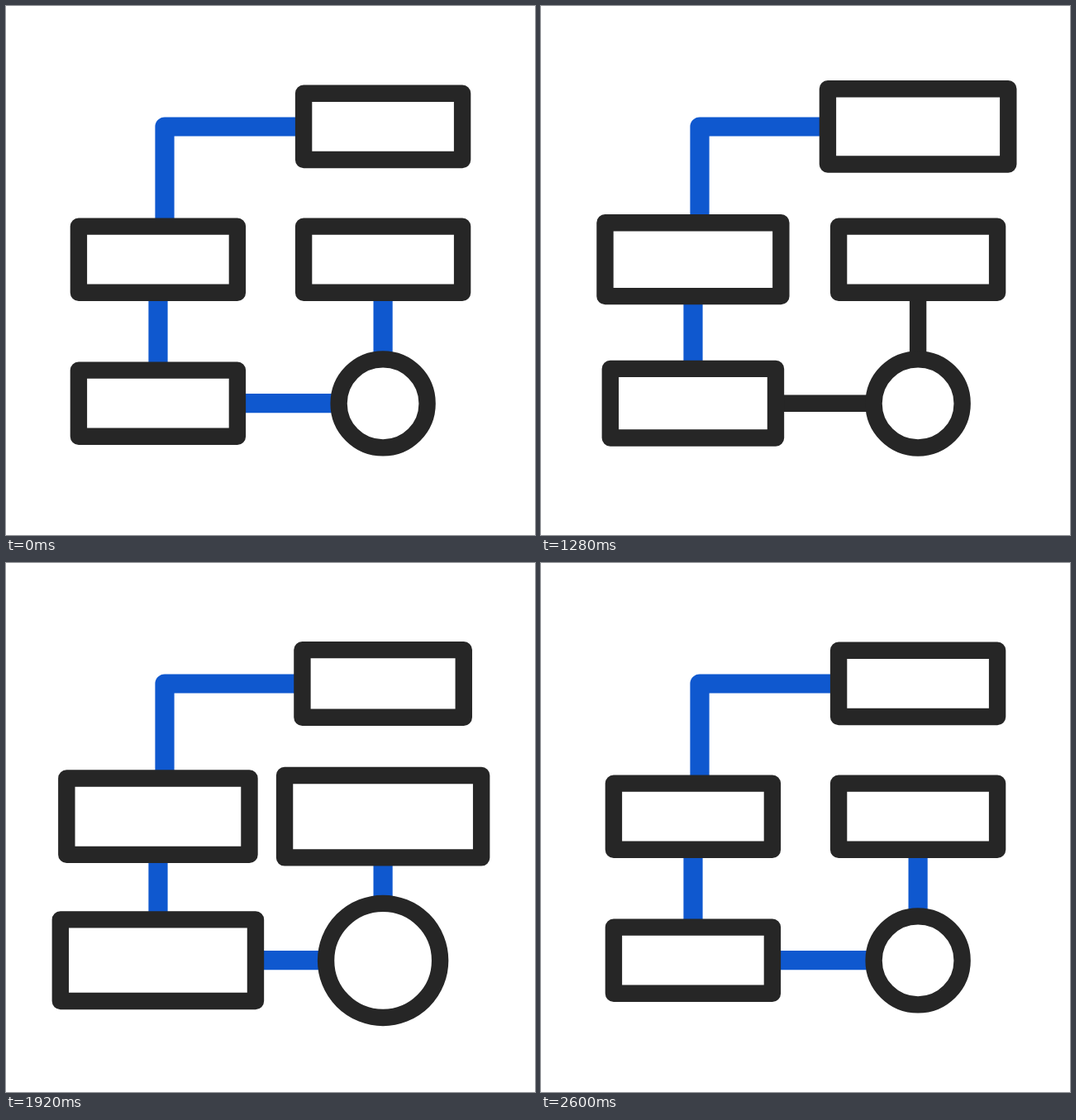
Animation, 640 px wide and 640 px high, one loop 2.72 s. Source, as an HTML page with a canvas:

```html
<!DOCTYPE html>
<html lang="en">
<head>
<meta charset="utf-8">
<title>Flowchart</title>
<style>
html, body { margin: 0; width: 100%; height: 100%; overflow: hidden; background: #fff; }
canvas { display: block; width: 640px; height: 640px; }
</style>
</head>
<body>
<canvas id="stage" width="640" height="640"></canvas>
<script>
const ctx = document.getElementById('stage').getContext('2d');
const DARK = '#262626', BLUE = '#0f58cf';
const LOOP = 2720, STEP = 40, REDRAW = 790;
const RISE = 480, HOLD = 110, FALL = 565;

// from/to: when the blue is wiped off; it is drawn again REDRAW ms later
const lines = [
  { pts: [[360, 146], [192, 146], [192, 267]], from: 80, to: 325, edge: 152.4 },
  { pts: [[184, 347], [184, 440]], from: 345, to: 520 },
  { pts: [[280, 480.7], [403, 480.7]], from: 530, to: 695 },
  { pts: [[456.1, 427], [456.1, 347]], from: 690, to: 850 }
];

const nodes = [
  { x: 456.1, y: 145.9, start: 890, grow: 0.15 },
  { x: 183.9, y: 306.7, start: 1070, grow: 0.27 },
  { x: 183.9, y: 480.7, start: 1160, grow: 0.29 },
  { x: 456.1, y: 480.9, start: 1265, grow: 0.3, r: 53.5 },
  { x: 456.1, y: 306.7, start: 1385, grow: 0.24 }
];

const ease = (t, from, to) => {
  const p = Math.min(1, Math.max(0, (t - from) / (to - from)));
  return (1 - Math.cos(Math.PI * p)) / 2;
};

const pulse = (t, start) => {
  const fall = start + RISE + HOLD;
  return ease(t, start, start + RISE) - ease(t, fall, fall + FALL);
};

const pathLength = pts => pts.slice(1).reduce(
  (sum, [x, y], i) => sum + Math.hypot(x - pts[i][0], y - pts[i][1]), 0);

function strokeLine(pts, color, width, from, to) {
  if (to - from < 0.01) return;
  ctx.strokeStyle = color;
  ctx.lineWidth = width;
  ctx.setLineDash([to - from, 9999]);
  ctx.lineDashOffset = -from;
  ctx.beginPath();
  pts.forEach(p => ctx.lineTo(...p));
  ctx.stroke();
  ctx.setLineDash([]);
}

function drawLine({ pts, from, to, edge }, t) {
  const len = pathLength(pts);
  const wiped = len * ease(t, from, to);
  const drawn = len * ease(t, from + REDRAW, to + REDRAW);
  strokeLine(pts, DARK, 20.4, 0, len);
  strokeLine(pts, BLUE, 23.2, wiped, len);
  ctx.save();
  if (edge && drawn < pts[0][0] - pts[1][0]) {
    ctx.beginPath();
    ctx.rect(0, 0, 640, edge);
    ctx.clip();
  }
  strokeLine(pts, BLUE, 23.2, 0, drawn);
  ctx.restore();
}

function drawNode({ x, y, start, grow, r }, t) {
  const s = 1 + grow * pulse(t, start);
  ctx.beginPath();
  if (r) ctx.arc(x, y, r * s, 0, 2 * Math.PI);
  else ctx.rect(x - 96 * s, y - 40.1 * s, 192 * s, 80.2 * s);
  ctx.fillStyle = '#fff';
  ctx.fill();
  ctx.strokeStyle = DARK;
  ctx.lineWidth = 20.4;
  ctx.stroke();
}

function draw(now) {
  let t = Math.floor((now % LOOP) / STEP) * STEP;
  if (t < 120) t = 0;
  ctx.fillStyle = '#fff';
  ctx.fillRect(0, 0, 640, 640);
  ctx.lineCap = ctx.lineJoin = 'round';
  lines.forEach(line => drawLine(line, t));
  nodes.forEach(node => drawNode(node, t));
}

const begin = performance.now();
function tick() {
  draw(performance.now() - begin);
  requestAnimationFrame(tick);
}
tick();
</script>
</body>
</html>
```
